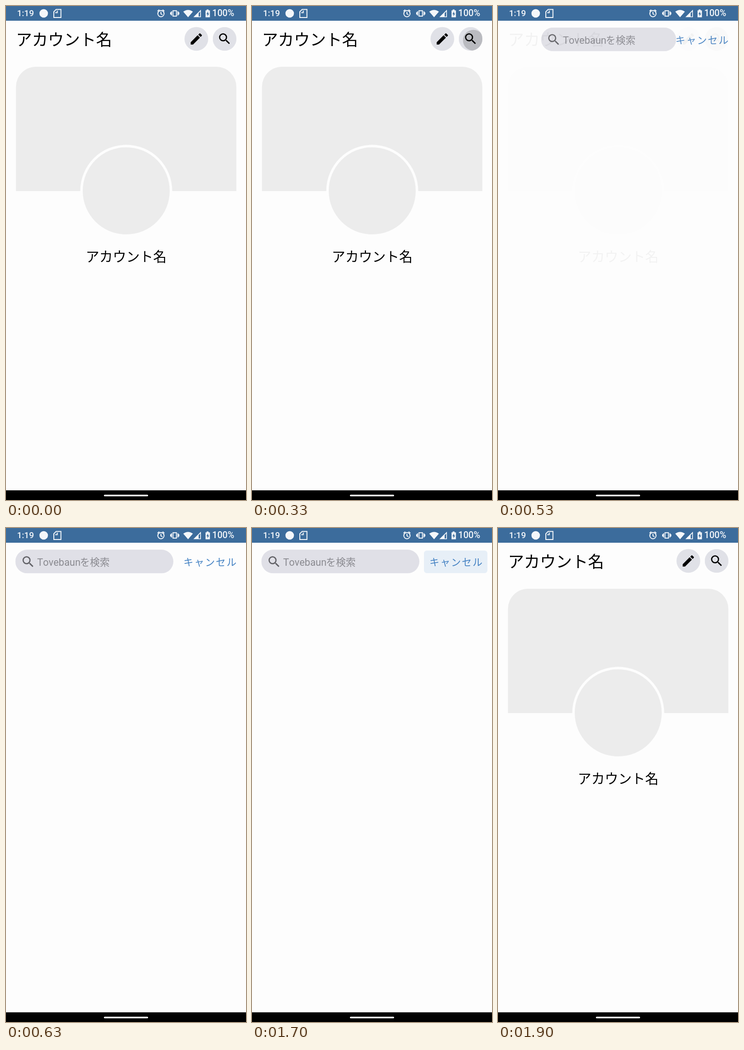
An HTML page for the animation above (1.93 s loop, 522 by 1073 pixels).

```html
<!DOCTYPE html>
<html lang="ja">
<head>
<meta charset="utf-8">
<style>
  html, body { margin: 0; height: 100%; overflow: hidden; background: #fdfdfd; }
  #stage { display: block; width: 100vw; height: 100vh; }
  text { font-family: "Noto Sans CJK JP", "Noto Sans CJK", sans-serif; font-kerning: none; }
  .latin { font-family: Roboto, sans-serif; }
  .status { font-weight: 500; fill: #f4f7fa; }
  .line { fill: none; stroke: #f4f7fa; stroke-width: 2; }
  .hint { font-size: 21.5px; fill: #8a8a90; }
</style>
</head>
<body>
<svg id="stage" viewBox="0 0 522 1073">
  <defs>
    <path id="lens" transform="scale(1.35)" d="M15.5 14h-.79l-.28-.27A6.471 6.471 0 0 0 16 9.5 6.5 6.5 0 1 0 9.5 16c1.61 0 3.09-.59 4.23-1.57l.27.28v.79l5 4.99L20.49 19l-4.99-5zm-6 0C7.01 14 5 11.99 5 9.5S7.01 5 9.5 5 14 7.01 14 9.5 11.99 14 9.5 14z"/>
    <clipPath id="round"><circle cx="25.75" cy="25.75" r="25.75"/></clipPath>
    <clipPath id="box"><rect x="374" y="49" width="138" height="49" rx="6"/></clipPath>
  </defs>
  <rect width="522" height="1073" fill="#fdfdfd"/>

  <g id="pages">
    <g id="home">
      <text x="21.7" y="85.8" font-size="34.8">アカウント名</text>
      <path d="M21.7 402V175.5A43.5 43.5 0 0 1 65.2 132H457.5A43.5 43.5 0 0 1 501 175.5V402Z" fill="#ececec"/>
      <circle cx="261.5" cy="401.5" r="100" fill="#fdfdfd"/>
      <circle cx="261.5" cy="401.5" r="94.6" fill="#ececec"/>
      <text x="261.5" y="554.5" font-size="29.3" text-anchor="middle">アカウント名</text>
      <circle cx="414" cy="71.4" r="25.75" fill="#e0e1e7"/>
      <path transform="translate(397.6 55.2) scale(1.36)" d="M3 17.25V21h3.75L17.81 9.94l-3.75-3.75L3 17.25zM20.71 7.04a1 1 0 0 0 0-1.41l-2.34-2.34a1 1 0 0 0-1.41 0l-1.83 1.83 3.75 3.75 1.83-1.83z"/>
      <svg id="button" height="51.5">
        <rect width="100%" height="51.5" rx="25.75" fill="#e0e1e7"/>
        <g clip-path="url(#round)"><circle id="tapSearch"/></g>
        <use class="icon" href="#lens"/>
      </svg>
    </g>
    <g id="search">
      <g clip-path="url(#box)"><circle id="tapCancel" fill="#4a88c8"/></g>
      <text x="386" y="81.7" font-size="21.5" letter-spacing="1.92" fill="#4482c3">キャンセル</text>
      <svg id="bar" height="51.5">
        <rect width="100%" height="51.5" rx="25.75" fill="#e0e0e7"/>
        <use class="icon" href="#lens" fill="#626267"/>
        <text class="hint latin" x="47.4" y="35">Tovebaun</text>
        <text class="hint" x="140.6" y="35">を検索</text>
      </svg>
    </g>
  </g>

  <rect width="522" height="32" fill="#3c6c9c"/>
  <g class="status">
    <text class="latin" x="24" y="22" font-size="18.7">1:19</text>
    <text class="latin" x="448.5" y="22.2" font-size="19.6">100%</text>
    <circle cx="82" cy="16" r="9.3"/>
    <path class="line" d="M109 7.5H119.5V25H104V12.5ZM111.5 10V14.5H107"/>
    <circle class="line" cx="337" cy="16.6" r="6.8"/>
    <path class="line" d="M337 12.5V17L340.3 19M329.5 11.3L333.5 8M344.5 11.3L340.5 8"/>
    <path class="line" d="M363.2 10.2H370.8V22H363.2ZM360 11.5V20.5M374 11.5V20.5M358 13.5V18.5M376 13.5V18.5" stroke-width="1.7"/>
    <path d="M385.5 12.3Q396 4.5 406.5 12.3L396 24.5Z"/>
    <path d="M407.5 24.3L424 8V24.3ZM419 15.5V22.7H422.4V12Z" fill-rule="evenodd"/>
    <path d="M434 9.5H436.5V7.5H440.5V9.5H443.5V24.5H434ZM439.6 11.8L435.8 17.8H438.2V22.3L441.8 16.2H439.6Z" fill-rule="evenodd"/>
  </g>
  <rect y="1052" width="522" height="21"/>
  <rect x="213" y="1061.5" width="96" height="3.4" rx="1.7" fill="#fff"/>
</svg>
<script>
const LOOP = 1930, FRAME = 33.2, MOVE = 170, RIPPLE = 140;
const $ = id => document.getElementById(id);
const clamp = x => Math.min(1, Math.max(0, x));
const mix = (a, b, p) => a + (b - a) * p;
const set = (el, attrs) => { for (const k in attrs) el.setAttribute(k, attrs[k]); };

// cubic-bezier(.4, 0, .2, 1)
function ease(x) {
  if (x <= 0 || x >= 1) return clamp(x);
  let lo = 0, hi = 1, u;
  for (let i = 0; i < 20; i++) {
    u = (lo + hi) / 2;
    const bx = 1.2 * u * (1 - u) ** 2 + .6 * u * u * (1 - u) + u ** 3;
    if (bx < x) lo = u; else hi = u;
  }
  return u * u * (3 - 2 * u);
}
const progress = (t, start) => ease(clamp((t - start) / MOVE));

// p = 0: round button, p = 1: full search field
function place(id, p) {
  const x = mix(449.7, 20.3, p);
  set($(id), { x, y: mix(45.7, 47, p), width: mix(501.2, 364, p) - x });
  set($(id).querySelector(".icon"), { x: 0, transform: `translate(${mix(9.6, 11.6, p)} ${mix(9.5, 10.2, p)})` });
}

function ripple(id, age, from, to, r0, r1, alpha) {
  const p = clamp(age / RIPPLE);
  set($(id), {
    cx: mix(from[0], to[0], p), cy: mix(from[1], to[1], p),
    r: mix(r0, r1, ease(p)), opacity: alpha * clamp(age / 47)
  });
}

function draw(t) {
  const base = t < 1500 ? 200 : 1500;
  const now = t < 200 ? 0 : base + Math.floor((t - base + 4) / FRAME) * FRAME;
  const closing = t >= 1500;
  const fade = progress(now, closing ? 1701 : 404);
  const move = progress(now, closing ? 1725 : 439);
  const [from, to] = closing ? ["search", "home"] : ["home", "search"];

  set($(to), { opacity: fade });
  set($(from), { opacity: 1 - fade });
  if ($("pages").lastElementChild !== $(from)) $("pages").append($(from));

  place("button", closing ? 1 - move : 0);
  place("bar", closing ? 1 : move);
  ripple("tapSearch", closing ? 0 : now - 300, [33.6, 29.7], [25.75, 25.75], 15.5, 51, .24);
  ripple("tapCancel", closing ? now - 1500 : 0, [450, 76], [443, 73.5], 41, 88, .12);
}

function tick() {
  draw(performance.now() % LOOP);
  requestAnimationFrame(tick);
}
tick();
</script>
</body>
</html>
```
